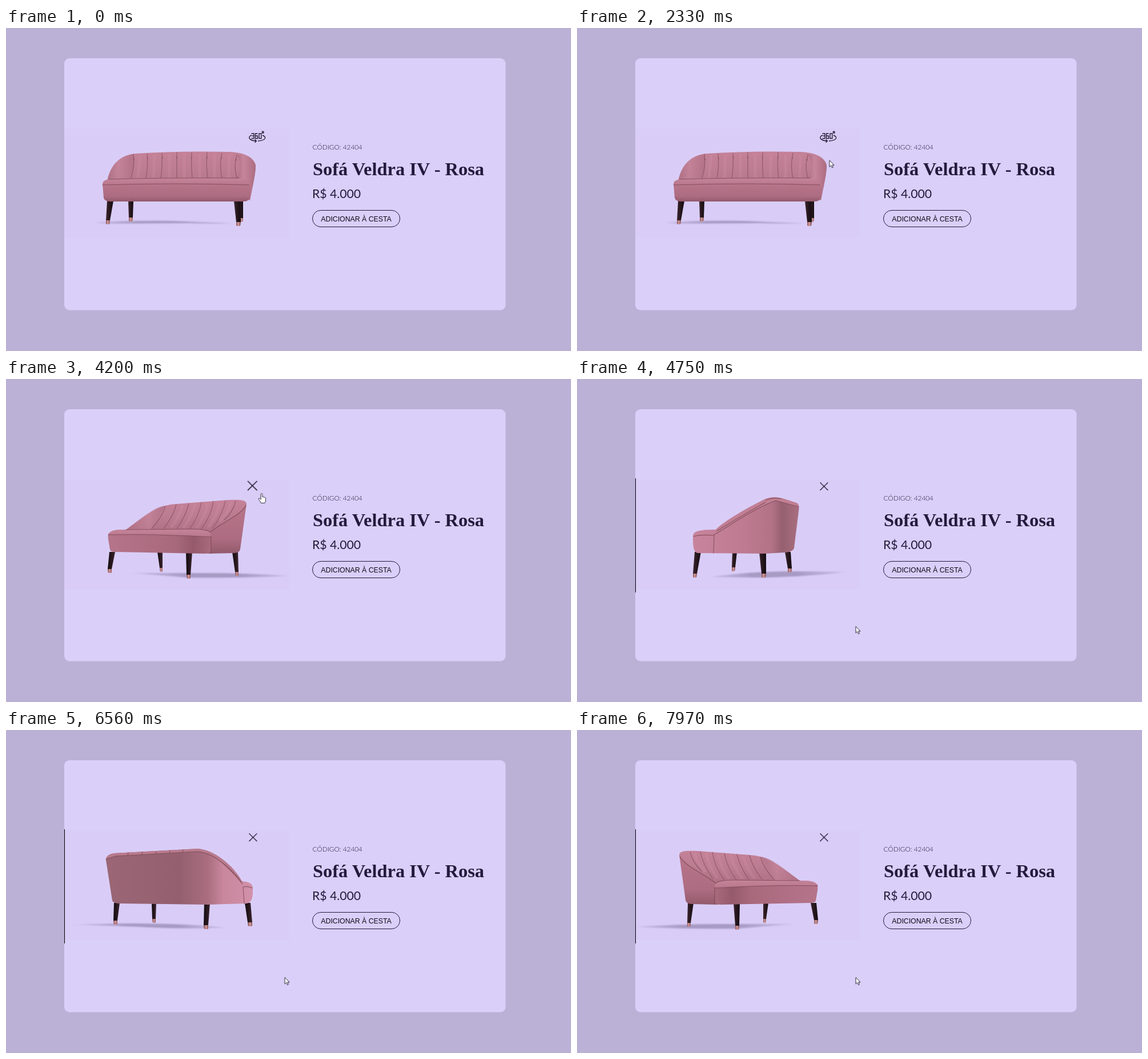
These frames come from a looping animation (989 by 566 pixels, 8000 ms). An HTML page:

```html
<!DOCTYPE html>
<html lang="pt-BR">
<head>
<meta charset="utf-8">
<title>Sofá 360°</title>
<style>
html, body { margin: 0; width: 100%; height: 100%; overflow: hidden; background: #bbb0d6; }
svg { display: block; width: 100%; height: 100%; }
text { fill: #231a3d; }
.code { font: 300 11.8px Lato, sans-serif; }
.price { font: 400 21.2px Lato, sans-serif; }
.title { font: bold 32.4px "Liberation Serif", serif; }
.button { font: 12.3px "Liberation Sans", Arial, sans-serif; fill: #0d0916; }
.seam, .fold { fill: none; stroke: #74434f; stroke-width: 1.1; stroke-linecap: round; opacity: .75; }
.fold { stroke: #84505f; stroke-width: 1.2; }
.shine { fill: none; stroke: #d797ab; stroke-width: 5; opacity: .22; }
.shadow { fill: url(#ground); filter: url(#soft); }
.icon { fill: none; stroke: #231a32; stroke-width: 1.35; }

.view, .step { animation: 8s step-end infinite; }
.view { opacity: 0; animation-name: turn; }
.front { animation-name: front; }
.last { animation-name: last; }
.caret { animation-name: blink; shape-rendering: crispEdges; }
.spin { animation-name: spin; }
.close { animation-name: close; }
.hover { animation-name: hover; transform-origin: 438px 194px; }
.arrow { animation-name: arrow; }
.hand { animation-name: hand; }
.pointer { animation: move 8s linear infinite; }

@keyframes turn { 0% { opacity: 1 } 10%, 100% { opacity: 0 } }
@keyframes front { 0% { opacity: 1 } 49.25%, 100% { opacity: 0 } }
@keyframes last { 0% { opacity: 0 } 99.25%, 100% { opacity: 1 } }
@keyframes spin { 0% { opacity: 1 } 39.75%, 100% { opacity: 0 } }
@keyframes close { 0% { opacity: 0 } 39.75%, 100% { opacity: 1 } }
@keyframes hover { 0%, 53.5%, 100% { transform: none } 32% { transform: scale(1.2) } }
@keyframes arrow { 0%, 53.5%, 100% { opacity: 1 } 32% { opacity: 0 } }
@keyframes hand { 0%, 53.5%, 100% { opacity: 0 } 32% { opacity: 1 } }
@keyframes blink {
  0%, 46.875%, 60.125%, 73.375%, 86.625%, 99.875%, 100% { opacity: 0 }
  40.25%, 53.5%, 66.75%, 80%, 93.25% { opacity: 1 }
}
@keyframes move {
  0%, 6.25% { transform: translate(738px, 568px) }
  7.5% { transform: translate(734px, 556px) }
  10% { transform: translate(668px, 512px) }
  12% { transform: translate(643px, 450px) }
  15.5%, 20.5% { transform: translate(620px, 401px) }
  22.5% { transform: translate(592px, 396px) }
  25% { transform: translate(515px, 372px) }
  27.5% { transform: translate(462px, 300px) }
  29.125% { transform: translate(442px, 232px) }
  30% { transform: translate(440px, 218px) }
  32% { transform: translate(444px, 203px) }
  34.5%, 40% { transform: translate(446px, 194px) }
  45.375% { transform: translate(445.5px, 198px) }
  53% { transform: translate(448px, 201px) }
  55% { transform: translate(456px, 265px) }
  57% { transform: translate(476px, 375px) }
  58.75%, 100% { transform: translate(488px, 433.5px) }
}
</style>
</head>
<body>
<svg viewBox="0 0 989 566">
  <defs>
    <filter id="soft" x="-10%" y="-80%" width="120%" height="260%"><feGaussianBlur stdDeviation="2.5 1"/></filter>
    <linearGradient id="ground"><stop stop-color="#b3a6d0" stop-opacity=".5"/><stop offset=".3" stop-color="#a79ac3"/><stop offset=".65" stop-color="#a79ac3"/><stop offset="1" stop-color="#b3a6d0" stop-opacity=".5"/></linearGradient>
    <linearGradient id="back" x2="0" y2="1"><stop stop-color="#c58298"/><stop offset=".5" stop-color="#b97a8f"/><stop offset="1" stop-color="#a9697e"/></linearGradient>
    <linearGradient id="base" x2="0" y2="1"><stop stop-color="#b8758b"/><stop offset=".7" stop-color="#ad6c81"/><stop offset="1" stop-color="#935a6c"/></linearGradient>
    <linearGradient id="corner"><stop stop-color="#a96a7e"/><stop offset=".17" stop-color="#945a6b"/><stop offset=".35" stop-color="#a9697d"/><stop offset="1" stop-color="#b5748a"/></linearGradient>
    <linearGradient id="cushion" x2="0" y2="1"><stop stop-color="#c5849a"/><stop offset="1" stop-color="#b8778c"/></linearGradient>
    <linearGradient id="arm"><stop stop-color="#a96b80"/><stop offset=".4" stop-color="#c6859b"/><stop offset="1" stop-color="#ac6c81"/></linearGradient>
    <linearGradient id="side"><stop stop-color="#c9849d"/><stop offset=".5" stop-color="#bd7a90"/><stop offset=".74" stop-color="#b37387"/><stop offset=".84" stop-color="#966070"/><stop offset="1" stop-color="#a96f80"/></linearGradient>
    <linearGradient id="rear"><stop stop-color="#d291aa"/><stop offset=".2" stop-color="#c9879d"/><stop offset=".31" stop-color="#a96d7f"/><stop offset=".5" stop-color="#94606f"/><stop offset="1" stop-color="#9b6675"/></linearGradient>
    <linearGradient id="shade"><stop stop-color="#b67389"/><stop offset=".17" stop-color="#b8788b"/><stop offset=".32" stop-color="#8d5a69"/><stop offset=".7" stop-color="#88566a"/><stop offset="1" stop-color="#9c6376"/></linearGradient>
    <linearGradient id="wood"><stop stop-color="#3c252d"/><stop offset=".5" stop-color="#25161c"/><stop offset="1" stop-color="#150d12"/></linearGradient>
    <linearGradient id="copper"><stop stop-color="#8c5357"/><stop offset=".45" stop-color="#d49d9f"/><stop offset="1" stop-color="#7f484c"/></linearGradient>

    <g id="quarterFront">
      <path class="shadow" d="M104 345Q180 340 250 340L380 340Q330 344 282 348Q190 349 104 345Z"/>
      <g data-legs="194 204 193 199 338,274 285 277 284 343,326 335 326 331 331,409 419 415 422 333"/>
      <path fill="url(#back)" d="M179 219C179 212 190 211 211 212L302 219C330 221 344 229 391 265L380 280H200Z"/>
      <path fill="url(#arm)" opacity=".6" d="M322 222C340 225 352 235 391 265L346 264Z"/>
      <path fill="url(#base)" d="M179 219C185 236 222 251 243 269L246 306L201 305Q191 305 190 298Z"/>
      <path class="fold" d="M198 214Q202 232 218 247M216 213Q220 235 238 261M237 214Q240 238 258 263M258 216Q262 240 279 263M280 218Q285 240 301 262M302 220Q308 242 324 262M321 223Q328 244 345 262"/>
      <path class="shine" d="M206 216Q210 234 226 249M226 216Q230 238 246 260M247 218Q250 240 267 261M269 219Q274 241 290 261M291 221Q296 242 311 260"/>
      <path fill="url(#corner)" d="M241 273L420 270Q422 271 421 281L418 299Q417 303 408 303L251 306Q241 306 241 300Z"/>
      <path fill="url(#cushion)" d="M241 277C239 267 250 263 275 263L402 264Q419 265 421 273Q335 271 241 277Z"/>
      <path class="seam" d="M180 221C186 237 223 252 242 268M241 277Q335 271 421 273M241 275V305M243 268Q250 263 275 263L390 264"/>
    </g>

    <g id="quarterBack">
      <path class="shadow" d="M220 346Q300 338 400 339L487 341Q410 343 350 346Q270 349 220 346Z"/>
      <g data-legs="175 185 172 180 337,246 256 249 257 342,340 348 341 347 331,404 414 408 415 334"/>
      <path fill="url(#rear)" d="M171 276C172 268 179 266 190 265C205 237 239 210 267 208L414 216Q428 218 428 228L417 299Q416 304 402 304L250 306L183 304C171 303 171 290 171 276Z"/>
      <path fill="#b97b8e" d="M190 266C205 237 239 210 267 208L414 216Q426 218 428 226L411 221L267 213C235 217 208 247 190 266Z"/>
      <path class="seam" d="M190 267C207 246 235 217 267 213L411 221L428 226M189 270C212 242 237 217 262 214M172 277Q179 273 188 275L186 304M293 210l1 4M316 211l1 5M340 213l1 4M364 214l1 5M389 215l1 5"/>
    </g>
  </defs>

  <rect width="989" height="566" fill="#bbb0d6"/>
  <rect x="102" y="53" width="772.5" height="441.5" rx="9" fill="#d9cff8"/>
  <rect x="102" y="176" width="394" height="192" fill="#d9cdf7"/>

  <g class="view front">
    <path class="shadow" d="M155 341Q210 337 290 338L396 342Q380 344 320 342L178 343Z"/>
    <g data-legs="214 223 215 222 332,408 415 410 415 333,177 188 175 182 337,399 410 403 411 340"/>
    <path fill="url(#back)" d="M177 268C183 239 200 222 228 220Q305 215 386 217C417 217 434 226 437 241C437 256 432 275 427 302L400 290L180 285Z"/>
    <path fill="url(#arm)" opacity=".65" d="M178 266C184 240 200 223 224 221Q225 245 218 264Z"/>
    <path fill="url(#arm)" d="M404 222Q434 224 437 241C437 256 432 275 427 302L410 280Q399 268 403 263Q417 245 404 222Z"/>
    <path class="fold" d="M223 221Q226 241 219 263M247 220Q249 243 245 263M273 219Q274 243 271 263M299 218V263M325 218Q324 243 326 263M352 218Q350 243 353 263M378 219Q373 243 378 263M404 222Q398 243 404 263"/>
    <path class="shine" d="M235 223L231 262M260 222L258 262M286 221V262M312 221V262M339 221V262M365 222V262M391 223L390 262"/>
    <path class="seam" d="M224 229v2M248 227v2M274 226v2M299 226v2M325 226v2M352 226v2M377 227v2M403 230v2"/>
    <path fill="url(#base)" d="M169 273H425L429 277Q428 293 426 299Q424 304 415 304H183Q173 304 171 298Z"/>
    <path fill="url(#cushion)" d="M169 275C169 267 174 265 190 264Q300 262 407 263Q422 264 424 274Q300 271 169 275Z"/>
    <path class="seam" d="M180 265Q300 262 408 263M169 275Q300 271 425 275"/>
  </g>

  <g class="view" style="animation-delay:-4.06s"><use href="#quarterFront" transform="translate(600) scale(-1 1)"/></g>

  <g class="view" style="animation-delay:-3.26s">
    <path class="shadow" d="M235 347Q300 337 380 337L468 338Q420 345 330 348Z"/>
    <g data-legs="206 217 203 210 341,272 280 271 277 330,319 331 323 331 341,364 374 369 376 332"/>
    <path fill="url(#side)" d="M203 276C203 267 211 264 243 264C257 249 305 222 330 210Q342 205 359 209L384 217Q390 219 388 232L380 296Q378 303 363 304L330 306L212 305C203 304 203 291 203 276Z"/>
    <path fill="#c17f94" d="M242 265C257 249 305 222 330 210Q342 205 359 209L384 217Q389 219 388 224L348 213C310 225 268 258 242 270Z"/>
    <path class="seam" d="M204 276Q216 272 240 274L239 305M240 273C264 259 309 227 348 213L388 224M245 266C268 252 305 230 330 216M331 212Q344 207 357 210"/>
  </g>

  <g class="view" style="animation-delay:-2.46s"><use href="#quarterBack"/></g>
  <g class="view" style="animation-delay:-1.66s"><use href="#quarterBack" transform="translate(603) scale(-1 1)"/></g>

  <g class="view" style="animation-delay:-.86s">
    <path class="shadow" d="M155 349Q210 339 290 340L368 349Q280 351 180 353Z"/>
    <g data-legs="243 252 241 248 330,266 277 264 271 341,338 346 341 348 330,382 393 389 397 342"/>
    <path fill="url(#shade)" d="M226 223Q228 216 240 210Q250 206 262 210C291 221 330 245 352 264C382 261 395 266 396 275V298Q395 305 380 305L270 306L245 304Q237 303 236 294Z"/>
    <path fill="#a76a7d" d="M226 223Q228 216 240 210Q250 206 262 210C291 221 330 245 354 265L352 269C320 248 275 219 248 212Z"/>
    <path class="seam" d="M227 223L248 212C275 219 322 248 355 271M255 210C287 221 329 246 352 265M354 274Q374 271 396 276M358 274L357 305"/>
  </g>

  <g class="view last"><use href="#quarterFront"/></g>

  <rect class="step caret" x="102" y="174" width="1" height="200"/>

  <g class="step hover">
    <g class="step spin icon">
      <path d="M429.5 185h4.5v8.5h-4.5M430.5 189h3.5M440.5 185h-4v8.5h4v-4.5h-4M443 185h3.8v8.5h-3.8z"/>
      <path d="M448.5 181.5h2.3v2.6h-2.3zM430 188C423 190 424 197 438 198M435.5 195.2l2.8 2.8l-2.8 2.8M449 188C457 191 455 197 441 198"/>
    </g>
    <path class="step close icon" d="M425.5 181.3L439.3 195M439.3 181.3L425.5 195"/>
  </g>

  <text class="code" x="536.5" y="213">CÓDIGO: 42404</text>
  <text class="title" x="537" y="258">Sofá Veldra IV - Rosa</text>
  <text class="price" x="536" y="297.5">R$ 4.000</text>
  <rect x="536.5" y="319.5" width="153" height="29" rx="14.5" fill="none" stroke="#231a3d"/>
  <text class="button" x="551.3" y="338.5">ADICIONAR À CESTA</text>

  <g class="pointer" fill="#fff" stroke="#1b1626" stroke-width=".9" stroke-linejoin="round">
    <path class="step arrow" d="M0 0V11.5L2.7 9L4.5 13L6.4 12.2L4.7 8.4H8Z"/>
    <path class="step hand" d="M-1.8 1.2Q-1.5-.2-.3-.2Q1 0 1 1.3V6Q2.2 5 3.2 6.3Q4.5 5.6 5.2 7Q6.8 6.8 6.6 8.6V12Q6.3 14.5 5 16.5H-1.5Q-2.5 14-4.8 11.2Q-6.5 8.8-5.2 8.2Q-4 7.6-1.8 10.2Z"/>
  </g>
</svg>
<script>
// Each leg: top left, top right, bottom left, bottom right, y where the metal tip starts.
const polygon = (points, fill) => `<polygon points="${points}" fill="url(#${fill})"/>`;
const leg = ([a, b, c, d, y]) =>
  polygon([a, 303, b, 303, d, y, c, y], "wood") +
  polygon([c, y, d, y, d - .6, y + 5.5, d - 2, y + 7, c + 1, y + 7, c, y + 5.5], "copper");

for (const group of document.querySelectorAll("[data-legs]"))
  group.innerHTML = group.dataset.legs.split(",").map(s => leg(s.split(" ").map(Number))).join("");
</script>
</body>
</html>
```
